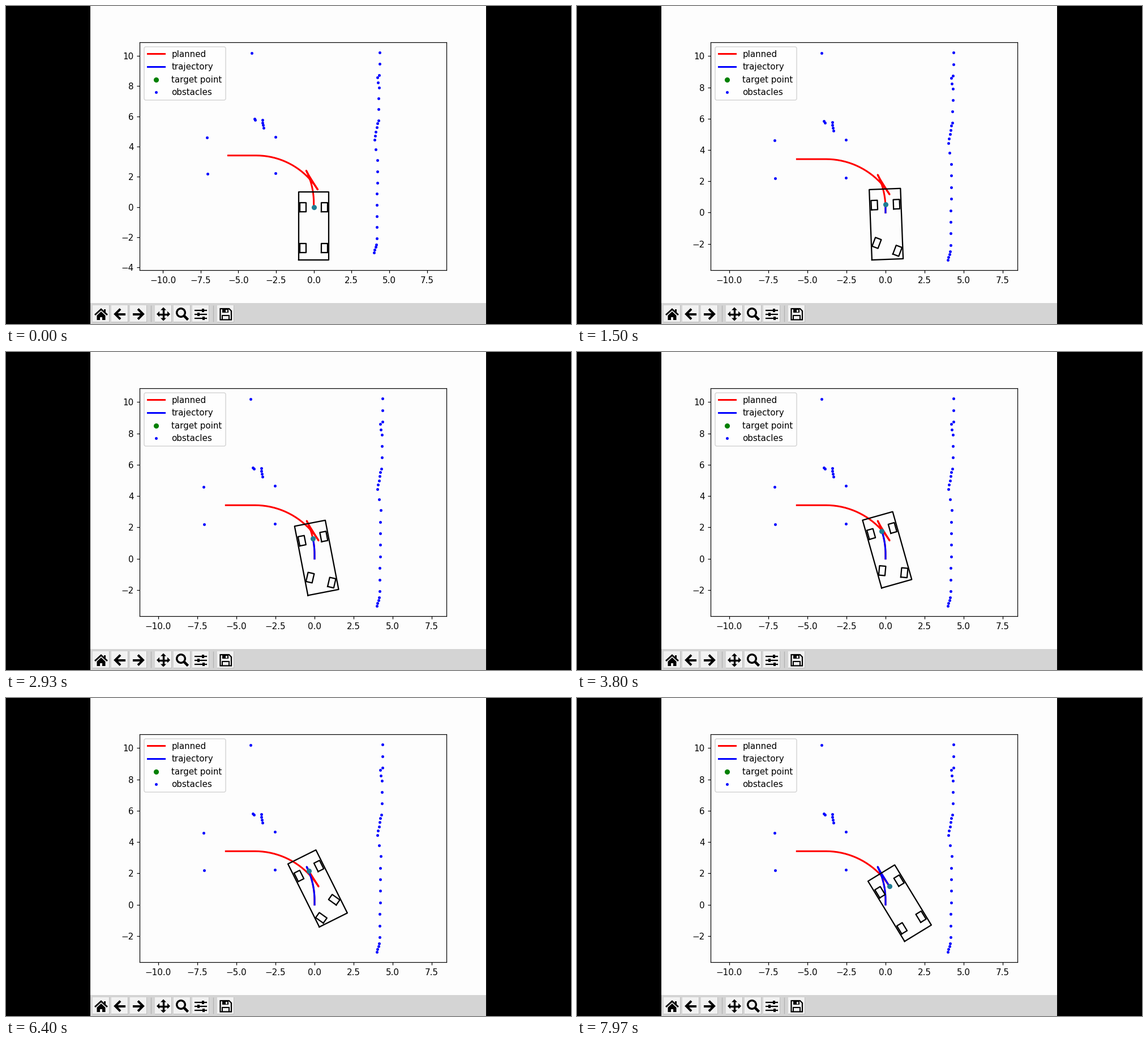
A matplotlib script for the animation above (8 s loop, 998 by 561 pixels).

```python
import numpy as np
import matplotlib.pyplot as plt
from matplotlib.animation import FuncAnimation
from matplotlib.patches import Circle, Polygon, Rectangle
from matplotlib.ticker import MultipleLocator

W, H, DPI = 998, 561, 128
FRAMES, STEP = 160, 50
PAPER, BAR, KEY, DOT = "#fdfdfd", "#d4d4d4", "#f2f2f2", "#1f7c94"
PX = 72 / DPI               # one pixel in points
PT = 100 / 72 * 1.092 * PX  # one point of the zoomed plot window

plt.rcParams.update({
    "font.family": "DejaVu Sans",
    "font.size": 10 * PT,
    "axes.linewidth": 0.8 * PT,
    "patch.linewidth": PT,
    "toolbar": "None",
})
for tick in ("xtick", "ytick"):
    plt.rcParams.update({f"{tick}.major.width": 0.8 * PT,
                         f"{tick}.major.size": 3.5 * PT,
                         f"{tick}.major.pad": 3.5 * PT})

fig = plt.figure(figsize=(W / DPI, H / DPI), dpi=DPI, facecolor="black")

# Window and toolbar, in pixel coordinates
win = fig.add_axes([0, 0, 1, 1])
win.set(xlim=(0, W), ylim=(H, 0))
win.axis("off")


def box(x0, y0, x1, y1, color="black"):
    win.add_patch(Rectangle((x0, y0), x1 - x0, y1 - y0, fc=color, lw=0))


def stroke(pts, width, color="black"):
    win.plot(*zip(*pts), color=color, lw=width * PX, solid_capstyle="butt",
             solid_joinstyle="miter")


def poly(pts):
    win.add_patch(Polygon(pts, fc="black", lw=0))


def home(x, y):
    stroke([(x - 11, y + 1.5), (x, y - 8.5), (x + 11, y + 1.5)], 2.8)
    box(x + 5, y - 9, x + 8, y - 2)
    poly([(x - 7.5, y + 2.5), (x, y - 4.5), (x + 7.5, y + 2.5),
          (x + 7.5, y + 10.5), (x - 7.5, y + 10.5)])
    box(x - 2, y + 5, x + 2, y + 10.5, KEY)


def arrow(x, y, d):
    stroke([(x - 10 * d, y), (x + 8 * d, y)], 4)
    stroke([(x - d, y - 9), (x + 8 * d, y), (x - d, y + 9)], 4)


def back(x, y):
    arrow(x, y, -1)


def forward(x, y):
    arrow(x, y, 1)


def move(x, y):
    for dx, dy in ((1, 0), (-1, 0), (0, 1), (0, -1)):
        stroke([(x, y), (x + 9 * dx, y + 9 * dy)], 3.4)
        poly([(x + 12 * dx, y + 12 * dy),
              (x + 7 * dx + 5 * dy, y + 7 * dy + 5 * dx),
              (x + 7 * dx - 5 * dy, y + 7 * dy - 5 * dx)])


def zoom(x, y):
    win.add_patch(Circle((x - 2, y - 2.5), 7.3, fill=False, lw=3.4 * PX))
    stroke([(x + 3.2, y + 2.7), (x + 10.5, y + 10)], 4.6)


def sliders(x, y):
    for dy, knob in ((-7, 4), (0, -4), (7, 5)):
        stroke([(x - 11, y + dy), (x + 11, y + dy)], 2.2)
        box(x + knob - 2.2, y + dy - 3, x + knob + 2.2, y + dy + 3)


def save(x, y):
    stroke([(x - 9.5, y - 9.5), (x + 6, y - 9.5), (x + 10, y - 5.5),
            (x + 10, y + 10), (x - 9.5, y + 10), (x - 9.5, y - 10.5)], 2.2)
    box(x - 6, y - 9.5, x + 5, y - 2.5)
    box(x + 0.5, y - 8, x + 3, y - 4, KEY)
    stroke([(x - 5.5, y + 10), (x - 5.5, y + 2.5), (x + 6, y + 2.5),
            (x + 6, y + 10)], 2)


box(149, 0, 848, H, PAPER)
box(149, 524, 848, H, BAR)
groups = [(168, [home, back, forward]), (278, [move, zoom, sliders]),
          (388, [save])]
for x0, icons in groups:
    if x0 > 168:
        stroke([(x0 - 22, 528), (x0 - 22, 557)], 1.2, "#b2b2b2")
    for n, icon in enumerate(icons):
        x = x0 + 33 * n
        box(x - 15, 528, x + 15, 558, "#bdbdbd")
        box(x - 15, 528, x + 14, 557, KEY)
        icon(x, 543.5)

# Planned path: arcs of one turning radius and straight runs
RADIUS = 4.8


def run(start, head, length, n=12):
    d = np.linspace(0, length, n)[:, None]
    return start + d * [-np.sin(head), np.cos(head)]


def arc(start, h0, h1, sign=1, n=40):
    h = np.linspace(h0, h1, n)
    return start + sign * RADIUS * np.column_stack(
        [np.cos(h) - np.cos(h0), np.sin(h) - np.sin(h0)])


CUSP, BACK = np.radians([26.4, 32])
path = run(np.zeros(2), 0, 0.28)
for piece, *args in [(arc, 0, CUSP), (arc, CUSP, BACK, -1), (run, BACK, -1),
                     (arc, BACK, np.pi / 2), (run, np.pi / 2, 1.86)]:
    path = np.vstack([path, piece(path[-1], *args)])
dist = np.r_[0, np.cumsum(np.hypot(*np.diff(path, axis=0).T))]

# Drive: speed and rear steering over time give distance and heading
WHEELBASE = 2.5


def speed(t):
    # forward, stop at the cusp, then reverse
    return np.interp(t, [0, 1.2, 3.8, 5.4, 5.45, 5.6, 6.4],
                     [0, 0.56, 0.56, 0.3, 0, 0, -0.75])


def steering(t):
    return np.radians(np.interp(t, [0.6, 1.7, 3.8, 5.4, 5.7, 6.5, 7.4],
                                [0, -28, -21, -28, 28, 28, 0]))


dt = STEP / 1000
times = np.arange(FRAMES) * dt
mid = times - dt / 2
moved = speed(mid) * dt
travel = np.cumsum(abs(moved))
heading = np.cumsum(-moved * np.tan(steering(mid)) / WHEELBASE)

# Obstacles: evenly spaced rows as (start, end, count)
rows = [((-4.1, 10.2), (-4.1, 10.2), 1), ((-3.94, 5.83), (-3.88, 5.75), 2),
        ((-3.42, 5.78), (-3.34, 5.23), 4), ((-2.55, 4.64), (-2.55, 2.23), 2),
        ((-7.09, 4.6), (-7.05, 2.2), 2), ((4.36, 10.22), (4.33, 8.74), 3),
        ((4.2, 8.59), (4.25, 8.23), 2), ((4.32, 7.91), (4.28, 5.74), 4),
        ((4.2, 5.54), (4.03, 4.45), 5), ((4.11, 3.8), (4.11, 3.8), 1),
        ((4.22, 3.09), (4.16, -2.08), 8), ((4.14, -2.47), (3.98, -3.02), 4)]
obstacles = np.vstack([np.linspace(*row) for row in rows])

# Plot
X0, X1, Y0, Y1 = 236.3, 778.3, 64, 466.3
ax = fig.add_axes([X0 / W, 1 - Y1 / H, (X1 - X0) / W, (Y1 - Y0) / H],
                  facecolor=PAPER)
ax.xaxis.set_major_locator(MultipleLocator(2.5))
ax.yaxis.set_major_locator(MultipleLocator(2))

dot = dict(ls="", ms=6 * PT, mew=0)
ax.plot(*path.T, "r-", lw=2 * PT, label="planned")
trail, = ax.plot([], [], "b-", lw=2 * PT, label="trajectory")
ax.plot([], [], "o", color="green", label="target point", **dot)
ax.plot(*obstacles.T, "b.", ms=6 * PT, mew=0.3 * PT, label="obstacles")
outlines = [ax.plot([], [], "k-", lw=1.5 * PT)[0] for _ in range(5)]
target, = ax.plot([], [], "o", color=DOT, **dot)
ax.legend(loc="upper left")


def rect(cx, cy, w, h):
    return np.array([cx, cy]) + 0.5 * np.array(
        [(-w, -h), (w, -h), (w, h), (-w, h), (-w, -h)])


def turn(pts, angle):
    c, s = np.cos(angle), np.sin(angle)
    return pts @ np.array([[c, s], [-s, c]])


BODY = rect(0, -1.25, 2, 4.5)
WHEELS = [rect(side, 0, 0.4, 0.6) for side in (-0.71, 0.71)]
REAR_AXLE = (0, -2.7)


def fit_view(low):
    # autoscale with 5 % margins and equal aspect
    left, bottom = obstacles.min(axis=0)
    right, top = obstacles.max(axis=0)
    low = min(low, bottom)
    span = top - low
    ax.set_ylim(low - 0.05 * span, top + 0.05 * span)
    half = 0.55 * span * (X1 - X0) / (Y1 - Y0)
    ax.set_xlim((left + right) / 2 - half, (left + right) / 2 + half)


def update(i):
    s, head, steer = travel[i], heading[i], steering(times[i])
    pos = np.array([np.interp(s, dist, axis) for axis in path.T])
    trail.set_data(*np.vstack([path[dist < s], pos]).T)
    target.set_data([pos[0]], [pos[1]])

    # the rear axle swings as one piece
    rear = [turn(w, steer) + REAR_AXLE for w in WHEELS]
    shapes = [pos + turn(p, head) for p in [BODY, *WHEELS, *rear]]
    for line, p in zip(outlines, shapes):
        line.set_data(*p.T)
    fit_view(shapes[0][:, 1].min())
    return [trail, target, *outlines]


anim = FuncAnimation(fig, update, frames=FRAMES, interval=STEP,
                     init_func=lambda: update(0), repeat=True, repeat_delay=0,
                     blit=False)
plt.show()
```
